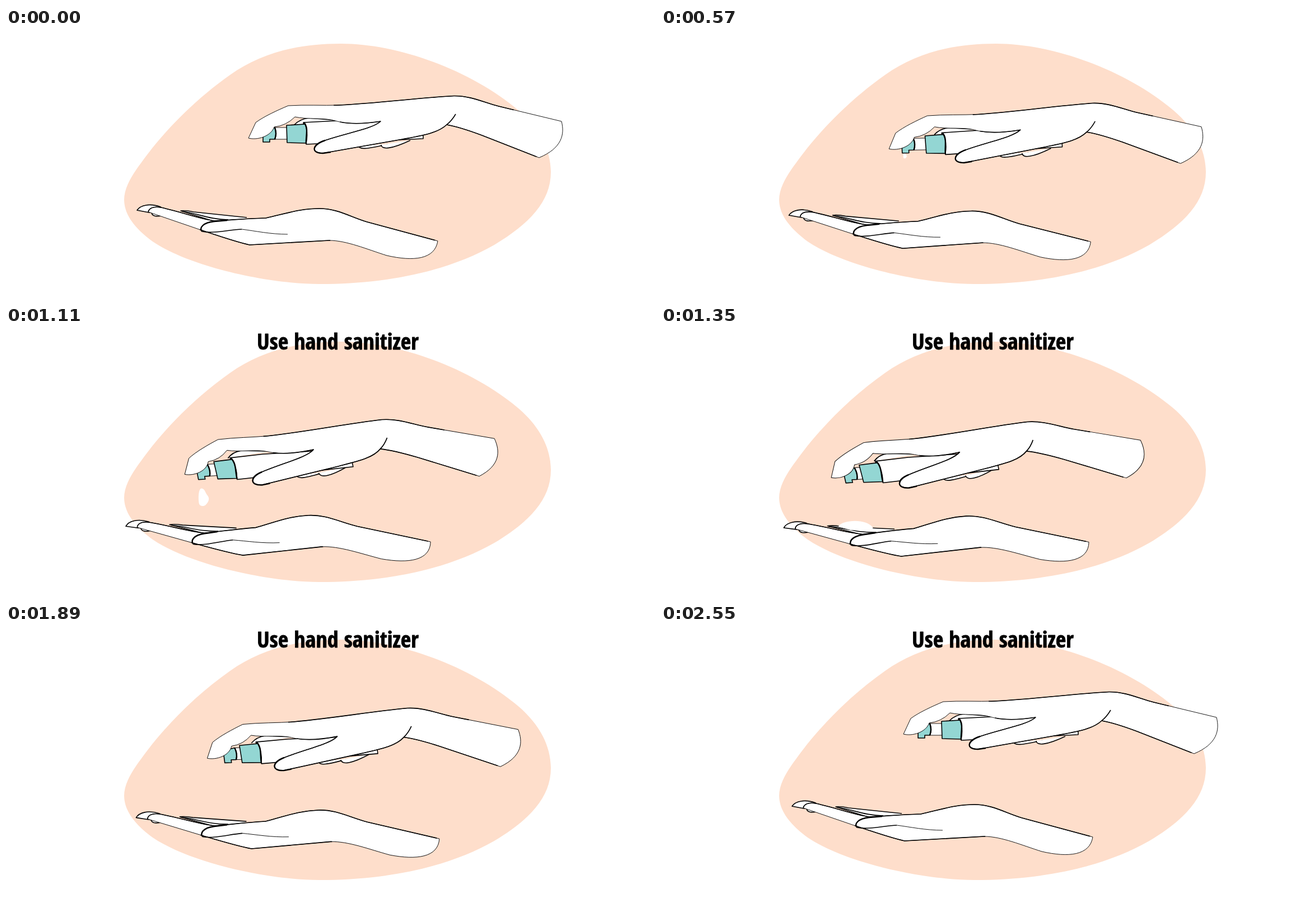
These frames come from a looping animation (1159x483 px, 2.7 s). An HTML page:

```html
<!DOCTYPE html>
<html lang="en">
<head>
<meta charset="utf-8">
<title>Use hand sanitizer</title>
<style>
html, body { margin: 0; width: 100%; height: 100%; overflow: hidden; background: #fff; }
svg { display: block; width: 100%; height: 100%; fill: none; stroke: #000; stroke-width: 1.6; stroke-linejoin: round; }
.white { fill: #fff; }
.teal { fill: #93d6d3; }
.liquid { fill: #fff; stroke: none; }
.thin { stroke-width: .9; }
.bold { stroke-width: 2.4; }
text { font: 900 40px Impact, "Open Sans Condensed", "Roboto Condensed", Roboto, sans-serif; text-anchor: middle; fill: #000; stroke-width: .8; }
</style>
</head>
<body>
<svg viewBox="0 0 1159 483">
  <defs>
    <path id="palm" pathLength="100" d="M254 329C256 320 268 318 285 323C315 330 345 341 372 345C397 344 425 341 464 340C500 332 525 323 560 323C592 323 615 338 645 347L771 381C766 414 728 418 680 407C645 396 608 380 577 380L435 388C412 383 380 372 350 362Z"/>
    <path id="grip" pathLength="100" d="M433 197L446 169C461 158 485 147 504 139C535 137 565 139 595 138C670 134 735 125 800 121.500C830 121 855 134 880 140L992 167C998 190 993 215 952 232L850 192Q810 177 787 173C771 188 745 192 708 199L566 224C544 224 546 209 570 201C612 187 655 180 669 167C630 173 605 171 588 166C570 160 538 164 516 159Q500 175 479 177C473 194 449 201 433 197Z"/>
  </defs>

  <path style="fill:#fedecb;stroke:none" d="M598 28C700 28 830 75 916 148C955 182 973 220 973 258C973 310 935 350 872 388C790 435 680 458 560 458C470 458 330 428 262 382C225 355 211 330 211 307C211 285 226 262 240 243C280 187 335 130 400 84C455 45 520 28 598 28Z"/>
  <text id="title" x="592.5" y="42">Use hand sanitizer</text>

  <g id="lower">
    <path class="white" d="M234 326C240 317 257 313 276 320L285 332L255 330Z"/>
    <path class="white" d="M260 331C262 338 270 337 279 336"/>
    <path class="white" d="M400 355L312 327Q322 326 335 329L430 339"/>
    <path d="M314 328C345 332 360 342 397 343"/>
    <use href="#palm" class="white thin"/>
    <use href="#palm" stroke-dasharray="49 20 22 9"/>
    <path class="bold" d="M395 344L372 346C351 348 345 358 350 364"/>
    <path d="M350 364C372 368 398 361 421 360"/>
    <path class="thin" d="M421 360C445 363 472 369 503 369"/>
  </g>
  <path id="puddle" class="liquid" d="M-39 0C-28 -16 28 -18 41 4C25 9 8 8 -10 9Q-26 5 -39 0Z"/>
  <path id="drop" class="liquid" d="M-4-16C2-16 3-7 7-3C11 2 9 8 4 13C0 17-7 16-8 12C-10 5-10-16-4-16Z"/>

  <g id="upper">
    <path class="white" d="M630 210C630 218 643 217 682 208"/>
    <path class="white" d="M670 209C671 218 688 217 722 201"/>
    <path class="white" d="M515 173C522 166 530 162 541 161L590 165"/>
    <g id="bottle">
      <g id="pump">
        <path class="white thin" d="M480 178H506V199H480Z"/>
        <path class="teal" d="M459 188V204H471V199H480Q484 189 480 178L470 180Z"/>
        <path class="bold" d="M480 178Q484 189 480 199"/>
      </g>
      <path class="white" d="M531 169L590 166H700L745 188V198L536 208Z"/>
      <path class="teal" d="M501 174L534 172Q540 187 536 206L502 205Z"/>
      <path class="bold" d="M532 169C541 178 535 194 536 207"/>
    </g>
    <use href="#grip" class="white thin"/>
    <use href="#grip" stroke-dasharray="0 12 22 12 42 12"/>
    <path d="M803 154Q796 166 787 173"/>
    <path class="bold" d="M580 222L566 224C544 224 546 209 570 201"/>
  </g>
</svg>
<script>
const LOOP = 2700, STEP = 30;
const $ = id => document.getElementById(id);
const place = (id, value) => $(id).setAttribute("transform", value);
const show = (id, on) => $(id).setAttribute("visibility", on ? "visible" : "hidden");

// Rises from 0 to 1 between two times, quicker at the start than at the end.
function ease(t, start, end) {
  const u = Math.min(1, Math.max(0, (t - start) / (end - start)));
  return (1 - Math.cos(Math.PI * u ** .8)) / 2;
}

function draw(t) {
  const x = 1.03 * (ease(t, 340, 1400) - ease(t, 1530, 2490));
  const y = 1.02 * (ease(t, 300, 1340) - ease(t, 1520, 2530));
  const press = 12 * (ease(t, 570, 1500) - ease(t, 2040, 2580));
  const slide = 18.6 * y * ease(t, 1230, 1590);
  const spread = ease(t, 1200, 1440) - ease(t, 1620, 1860);
  const fall = (t - 540) / 690;

  place("upper", `matrix(1 ${-.065 * y} ${.22 * x} 1 ${-169 * x} ${101 * y})`);
  place("bottle", `translate(${-13.5 * x} ${4 * x})`);
  place("pump", `translate(${press} 0)`);
  place("lower", `matrix(1 ${-.054 * y} ${.14 * y} 1 ${slide - 67 * y} ${47 * y})`);
  place("drop", `translate(${460 - 118 * x} ${228 + 115 * fall ** 2}) scale(${Math.min(1, .3 + .85 * fall)})`);
  place("puddle", `translate(347 ${344 + 14 * y}) scale(${spread})`);
  show("drop", fall >= 0 && fall < 1);
  show("puddle", spread > 0);
  show("title", t >= 960);
}

const title = $("title");
title.style.fontSize = 40 * 289 / title.getComputedTextLength() + "px";

function frame(now) {
  const t = now % LOOP;
  draw(t - t % STEP);
  requestAnimationFrame(frame);
}
draw(0);
requestAnimationFrame(frame);
</script>
</body>
</html>
```
